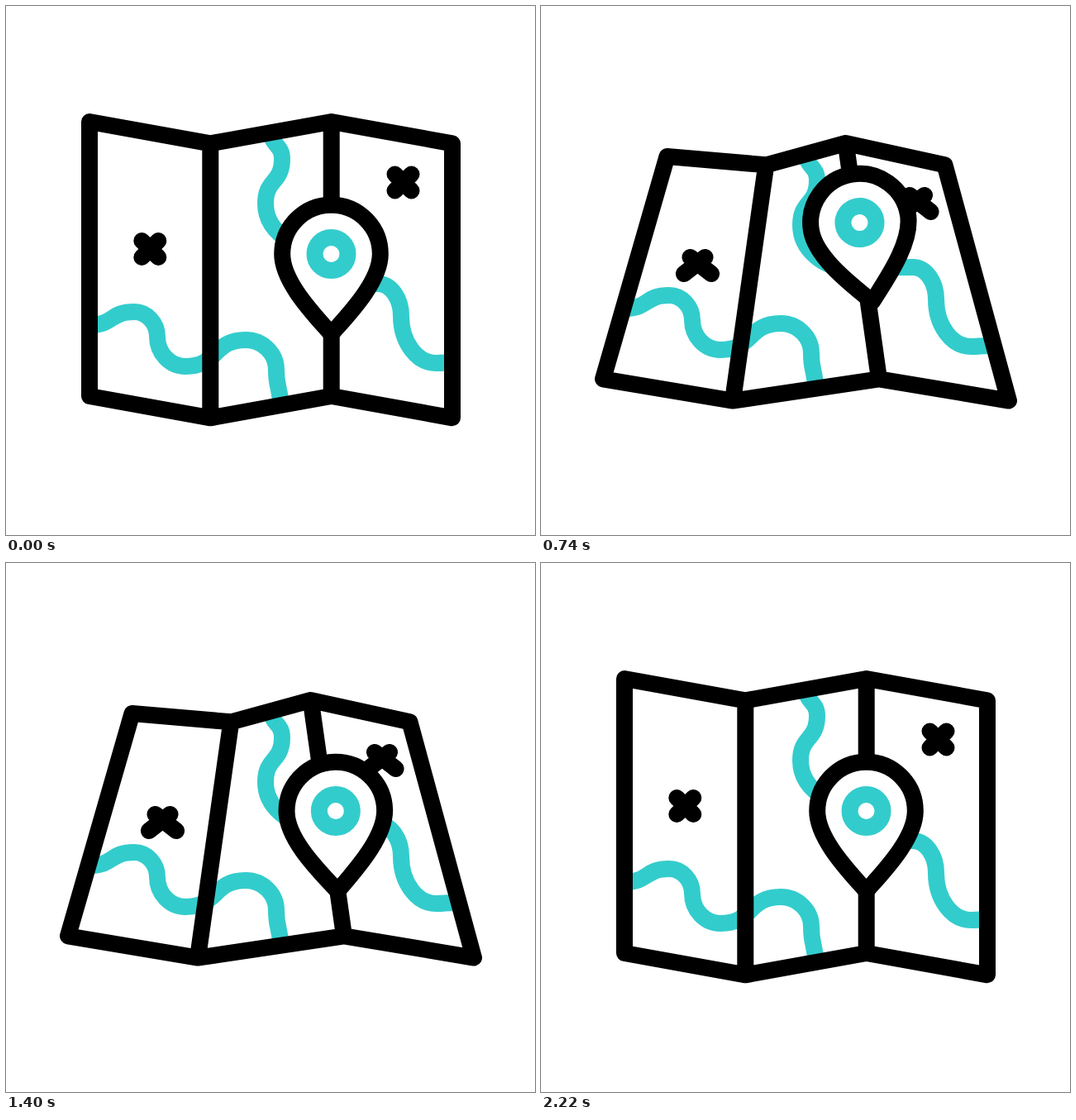
Write an HTML page that moves like this. It is 640 by 640 pixels and loops after 2400 ms.

```html
<!DOCTYPE html>
<html lang="en">
<head>
<meta charset="utf-8">
<title>Map pin</title>
<style>
  html, body { margin: 0; width: 100%; height: 100%; overflow: hidden; background: #fff; }
  svg { display: block; width: 100%; height: 100%; }
  path, circle { fill: none; stroke: #000; stroke-width: 20; stroke-linecap: round; stroke-linejoin: round; }
  .river { stroke: #33cccc; stroke-linecap: butt; }
  .body { fill: #fff; }
</style>
</head>
<body>
<svg viewBox="0 0 640 640">
  <path id="left" class="river"/>
  <path id="right" class="river"/>
  <path id="sheet"/>
  <path id="marks"/>
  <g id="pin">
    <path class="body" d="M0 -3 C-18 -24 -59.3 -65 -59.3 -100 A59.3 59.3 0 0 1 59.3 -100 C59.3 -65 18 -24 0 -3 Z"/>
    <circle class="river" cy="-100" r="20"/>
  </g>
</svg>
<script>
const LOOP = 2400;
const [left, right, sheet, marks, pin] =
  ["left", "right", "sheet", "marks", "pin"].map(id => document.getElementById(id));

const mix = (a, b, p) => a + (b - a) * p;

// Smooth step from 0 to 1 between two times.
function ease(t, from, to) {
  const k = Math.min(1, Math.max(0, (t - from) / (to - from)));
  return k * k * (3 - 2 * k);
}

// Four creases, mirrored about the middle; folding narrows the top and widens the foot.
function sheetPath(p) {
  const top = [], foot = [];
  for (let i = 0; i < 4; i++) {
    const side = i < 2 ? -1 : 1, outer = i % 3 === 0, dip = 26.3 * (i % 2);
    const flat = outer ? 219.5 : 73.2;
    const tx = 320.5 + side * mix(flat, outer ? 168 : 48.2, p);
    const fx = 320.5 + side * mix(flat, outer ? 245.5 : 88.5, p);
    const lag = i ? 26 : 42;
    top.push(`${tx} ${140 + dip + lag * p}`);
    foot.push(`${fx} ${472 + dip - 20.7 * p}`);
  }
  return `M${top.join("L")}L${foot.slice().reverse().join("L")}Z` +
    `M${top[1]}L${foot[1]}M${top[2]}L${foot[2]}`;
}

// Curve through points that are each crossed level ("h") or upright ("v").
function bendPath(points) {
  const handle = ([x, y, dir], [tx, ty]) =>
    dir === "h" ? `${mix(x, tx, 0.55)} ${y}` : `${x} ${mix(y, ty, 0.55)}`;
  return points.map((b, i) => {
    const a = points[i - 1];
    return a ? `C${handle(a, b)} ${handle(b, a)} ${b[0]} ${b[1]}` : `M${b[0]} ${b[1]}`;
  }).join("");
}

const leftBends = [
  [101, 386, "h"], [155, 370, "h"], [183, 400, "v"], [217, 436, "h"],
  [290, 404, "h"], [327, 440, "v"], [332, 484, "v"]
];
const rightBends = [
  [321, 152, "v"], [334, 185, "v"], [314, 239, "v"], [375, 292, "h"],
  [450, 336, "h"], [478, 375, "v"], [520, 432, "h"], [542, 431, "h"]
];

// The upper part of the map sinks while the lower part rises.
const shift = (bends, p) =>
  bends.map(([x, y, dir]) => [x, y + (y < 320 ? 26 : -20) * p, dir]);

function crossPath(x, y, p) {
  const head = mix(10, 9, p), foot = mix(10, 16.6, p);
  return [-1, 1].map(s => `M${x + s * head} ${y - 10}L${x - s * foot} ${y + 10}`).join("");
}

function draw(t) {
  const p = ease(t, 200, 600) - ease(t, 1800, 2200);
  const lift = 43.5 * (ease(t, 290, 850) - ease(t, 1000, 1300));
  const tilt = -9.5 * ease(t, 460, 780) + 19.1 * ease(t, 780, 1000)
    - 11 * ease(t, 1000, 1340) + 1.4 * ease(t, 1780, 2020);

  left.setAttribute("d", bendPath(shift(leftBends, p)));
  right.setAttribute("d", bendPath(shift(rightBends, p)));
  sheet.setAttribute("d", sheetPath(p));
  marks.setAttribute("d",
    crossPath(174.3 + 15.2 * p, 294 + 20 * p, p) +
    crossPath(480.5 - 25.5 * p, 213.5 + 25.5 * p, p));
  pin.setAttribute("transform",
    `translate(${393.5 + 7.8 * p} ${400 - lift}) rotate(${tilt})`);
}

const start = performance.now();
function tick() {
  draw((performance.now() - start) % LOOP);
  requestAnimationFrame(tick);
}
tick();
</script>
</body>
</html>
```
